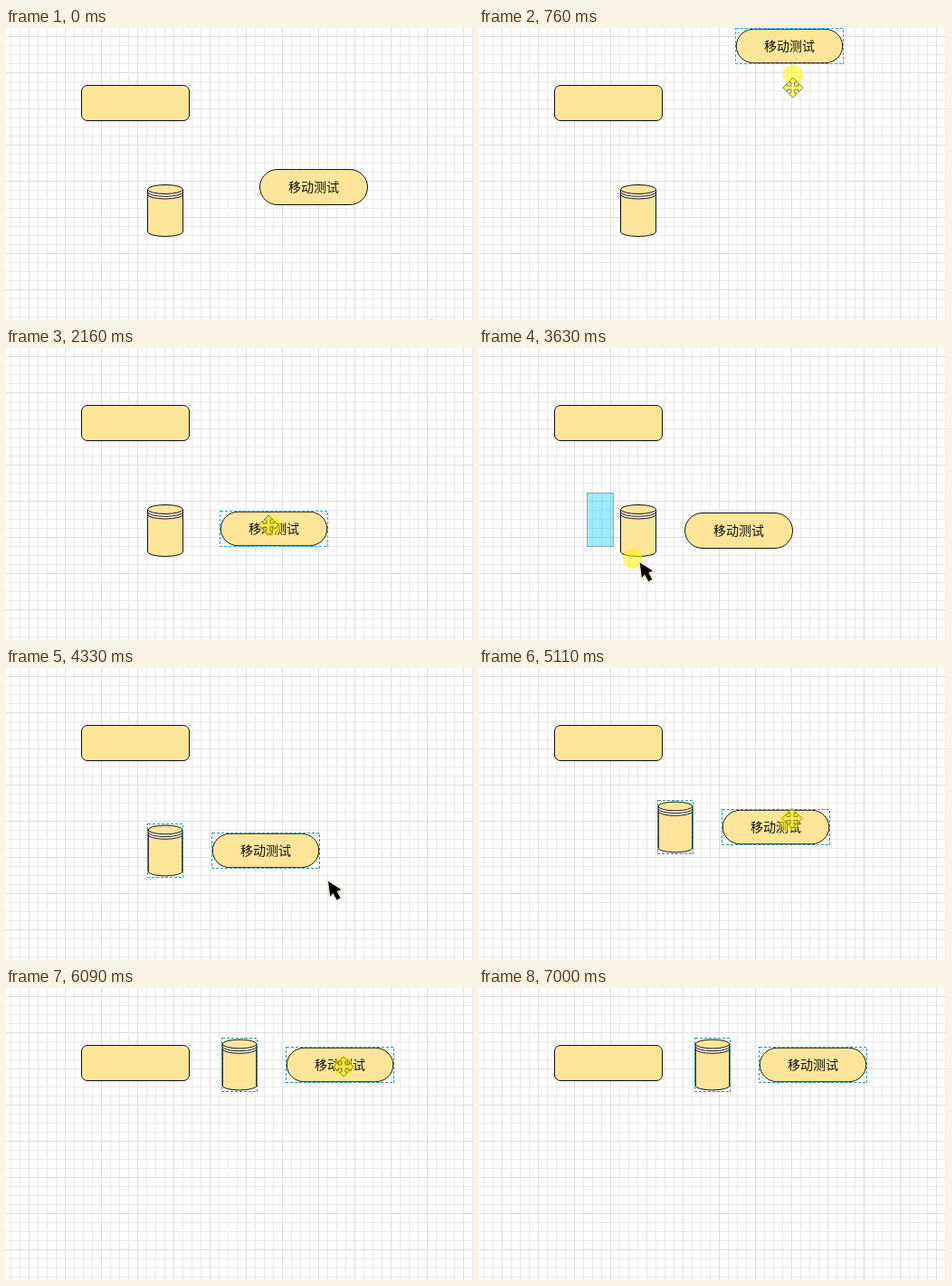
These frames come from a looping animation (516x323 px, 7.06 s). An HTML page:

```html
<!DOCTYPE html>
<html lang="zh">
<head>
<meta charset="utf-8">
<title>移动测试</title>
<style>
  html, body { margin: 0; width: 100%; height: 100%; overflow: hidden; background: #fff; }
  svg { display: block; width: 516px; height: 323px; }
  .shape { fill: #fde599; stroke: #111; }
  .line { fill: none; stroke: #111; }
  .box { fill: none; stroke-dasharray: 3 2; shape-rendering: crispEdges; }
  text { font: 14px "Noto Sans CJK SC", "Noto Sans CJK", sans-serif; text-anchor: middle; fill: #111; }
</style>
</head>
<body>
<svg viewBox="0 0 516 323">
  <defs>
    <pattern id="grid" x="5" y="9" width="40" height="40" patternUnits="userSpaceOnUse">
      <g fill="none" shape-rendering="crispEdges">
        <path d="M.5 0V40M10.5 0V40M30.5 0V40M0 10.5H40M0 20.5H40M0 30.5H40" stroke="#ebebeb"/>
        <path d="M20.5 0V40M0 .5H40" stroke="#dedede"/>
      </g>
    </pattern>
  </defs>
  <rect width="516" height="323" fill="url(#grid)"/>
  <rect class="shape" x="83.5" y="63.5" width="119" height="39" rx="6.5"/>

  <g id="drum">
    <g id="drumBody">
      <path class="shape" d="M-19.5-23.5V23.5A19.5 5 0 0 0 19.5 23.5V-23.5Z"/>
      <path d="M-19.5-23.5A19.5 5 0 0 0 19.5-23.5V-18A19.5 5 0 0 1-19.5-18Z" fill="#fffaf0"/>
      <path class="line" d="M-19.5-20.7A19.5 5 0 0 0 19.5-20.7M-19.5-18A19.5 5 0 0 0 19.5-18M-19.5-23.5V23.5M19.5-23.5V23.5"/>
      <ellipse class="shape" cy="-23.5" rx="19.5" ry="5"/>
    </g>
    <rect class="box" id="drumBox" x="-19.5" y="-29.5" width="39" height="59" stroke="#2a9aa3"/>
  </g>

  <g id="pill">
    <rect class="shape" id="pillBody" x="-59.5" y="-19.5" width="119" height="39" rx="19.5"/>
    <rect class="box" id="pillBox" x="-59.5" y="-19.5" width="119" height="39"/>
    <text y="5">移动测试</text>
  </g>

  <rect id="marquee" x="119.5" y="160.5" fill="#1accff" fill-opacity=".42" stroke="#8a9aa0" stroke-opacity=".8"/>
  <circle id="halo" r="11" fill="#fff200" fill-opacity=".55"/>
  <path id="arrow" d="M1 1L15 10L10.5 12L14.5 19.5L10.5 21.5L6.5 14L3.2 17.5Z" stroke="#e6e6cf" stroke-width="3.5" stroke-linejoin="round" paint-order="stroke"/>
  <path id="move" d="M0-11L5-6H2V-2H6V-5L11 0L6 5V2H2V6H5L0 11L-5 6H-2V2H-6V5L-11 0L-6-5V-2H-2V-6H-5Z" fill="#fff04a" fill-opacity=".7" stroke="#857d20"/>
</svg>
<script>
const LOOP = 7060, STEPS = 101, STEP = LOOP / STEPS;

// All times below count screen refreshes (steps)
const DRAG1 = [6, 41], MARQUEE = [46, 56], DRAG2 = [69, 88];
const GRAB = [4, 2], DRUM_OFFSET = -111;

// Key points of the dragged pill: step, x, y
const route = [
  [6, 340, 176], [11, 343, 20], [14, 341, 190], [17, 271, 98], [18, 274, 97],
  [20, 338, 97], [22, 343, 20], [28, 338, 195], [31, 296, 200], [32, 286, 194],
  [33, 200, 190], [36, 260, 254], [40, 287, 202],
  [69, 287, 202], [76, 361, 142], [79, 369, 103], [81, 369, 85]
];

// Free pointer moves, each along a quadratic curve
const trips = [
  { span: [0, 6], from: [469, 322], via: [404, 250], to: [344, 178] },
  { span: [41, 46], from: [291, 204], via: [160, 168], to: [119, 160] },
  { span: [46, 55], from: [119, 160], via: [115, 262], to: [366, 265], power: 1.75 },
  { span: [57, 62], from: [366, 265], via: [362, 250], to: [355, 235] },
  { span: [62, 67], from: [355, 235], via: [325, 218], to: [291, 204] },
  { span: [88, 100], from: [373, 87], via: [400, 200], to: [482, 335] }
];

const $ = id => document.getElementById(id);
const clamp = (v, lo, hi) => Math.min(hi, Math.max(lo, v));
const within = (t, [a, b]) => t >= a && t < b;
const show = (id, on) => $(id).style.display = on ? "" : "none";
const place = (id, [x, y], scale = "") => $(id).setAttribute("transform", `translate(${x} ${y})${scale}`);

const slope = (i, axis) => (route[i + 1][axis] - route[i][axis]) / (route[i + 1][0] - route[i][0]);

// Monotone tangents keep the route from overshooting its points
function tangent(i, axis) {
  if (i === 0 || i === route.length - 1) return 0;
  const l = slope(i - 1, axis), r = slope(i, axis);
  return l * r <= 0 ? 0 : 2 * l * r / (l + r);
}

function pillAt(t) {
  t = clamp(t, route[0][0], route[route.length - 1][0]);
  const i = Math.max(0, route.findIndex(k => k[0] >= t) - 1);
  const a = route[i], b = route[i + 1];
  const h = b[0] - a[0], u = (t - a[0]) / h, v = 1 - u;
  return [1, 2].map(n =>
    v * v * (1 + 2 * u) * a[n] + u * u * (3 - 2 * u) * b[n] +
    h * u * v * (v * tangent(i, n) - u * tangent(i + 1, n)));
}

const dragging = t => within(t, DRAG1) || within(t, DRAG2);

// While dragging, the shape trails the pointer by one step
function mouseAt(t) {
  if (dragging(t)) return pillAt(t + 1).map((v, n) => v + GRAB[n]);
  const { span, from, via, to, power = 1 } = trips.filter(p => p.span[0] <= Math.max(0, t)).pop();
  const u = clamp((t - span[0]) / (span[1] - span[0]), 0, 1) ** power, v = 1 - u;
  return from.map((p, n) => v * v * p + 2 * u * v * via[n] + u * u * to[n]);
}

function draw(t) {
  const pill = pillAt(t).map(Math.round);
  const both = t >= MARQUEE[1];
  const picked = both || within(t, [DRAG1[0], MARQUEE[0]]);

  place("pill", pill);
  $("pillBody").setAttribute("transform", picked ? "scale(.987 .96)" : "");
  $("pillBox").setAttribute("stroke", both ? "#2a9aa3" : "#12b4ee");
  show("pillBox", picked);

  place("drum", both ? [pill[0] + DRUM_OFFSET, pill[1]] : [176, 202]);
  $("drumBody").setAttribute("transform", both ? "scale(.97 .98)" : "");
  show("drumBox", both);

  const selecting = within(t, [MARQUEE[0] + 1, MARQUEE[1]]);
  if (selecting) {
    const [x, y] = mouseAt(t - 1).map(Math.round);
    $("marquee").setAttribute("width", Math.max(0, x - 120));
    $("marquee").setAttribute("height", Math.max(0, y - 161));
  }
  show("marquee", selecting);

  const mouse = mouseAt(t);
  const over = Math.abs(mouse[0] - pill[0]) < 60 && Math.abs(mouse[1] - pill[1]) < 20;
  const moving = dragging(t) || (over && !selecting);
  place("arrow", mouse);
  place("move", mouse);
  place("halo", mouseAt(t - 0.2));
  show("arrow", !moving);
  show("move", moving);
  show("halo", dragging(t) || selecting);
}

const start = performance.now();
function tick() {
  const t = (performance.now() - start) % LOOP;
  // Refreshes land on whole 10 ms marks, slightly ahead of even steps
  draw(Math.min(STEPS - 1, Math.floor((t + 12) / STEP)));
  requestAnimationFrame(tick);
}
tick();
</script>
</body>
</html>
```
